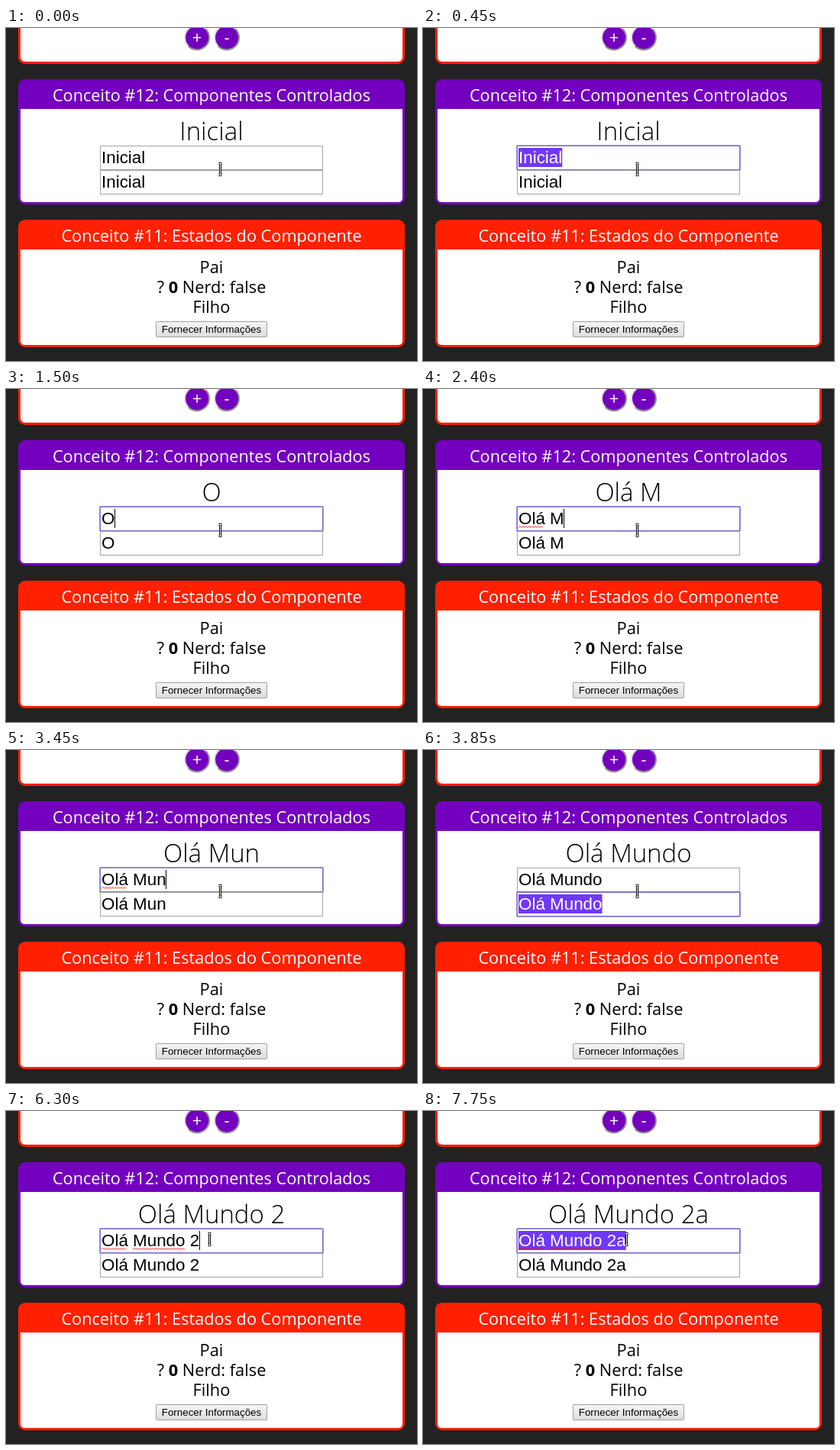
An HTML page that plays this animation: 538x436 px, repeating every 8 s.

```html
<!DOCTYPE html>
<html lang="pt">
<head>
<meta charset="utf-8">
<title>Componentes Controlados</title>
<style>
  html, body { margin: 0; width: 100%; height: 100%; overflow: hidden; background: #222; }
  svg { display: block; width: 538px; height: 436px; }
  text { font-family: "Open Sans", "Noto Sans", sans-serif; font-size: 21.8px; }
  .mid { text-anchor: middle; }
  .head { fill: #fff; font-size: 21.7px; }
  .sign { fill: #fff; font-size: 22px; }
  .title { font-size: 33px; font-weight: 300; }
  .field { font-family: "Liberation Sans", Arial, sans-serif; font-size: 22.4px; }
  .label { font-family: "Liberation Sans", Arial, sans-serif; font-size: 13.33px; }
  .bold { font-weight: 700; }
</style>
</head>
<body>
<svg id="stage" viewBox="0 0 538 436">
  <defs>
    <linearGradient id="face" x1="0" y1="0" x2="0" y2="1">
      <stop offset="0" stop-color="#f6f6f6"/>
      <stop offset="1" stop-color="#dcdcdc"/>
    </linearGradient>
  </defs>
</svg>
<script>
const LOOP = 8000, SHIFT = 38, LEFT = 125;
const PURPLE = '#7300be', RED = '#ff2000';
const stage = document.getElementById('stage');

function add(parent, tag, attrs = {}, content = '') {
  const el = document.createElementNS('http://www.w3.org/2000/svg', tag);
  for (const key in attrs) el.setAttribute(key, attrs[key]);
  if (content) el.textContent = content;
  parent.appendChild(el);
  return el;
}

const set = (el, name, value) => el.setAttribute(name, value);
const show = (el, on) => set(el, 'visibility', on ? 'visible' : 'hidden');
const centred = (parent, y, cls, content) =>
  add(parent, 'text', { x: 269, y, class: 'mid ' + cls }, content);

// Card with a coloured header; returns a function that sets its height
function card(parent, y, color, heading) {
  const outer = add(parent, 'rect', { x: 16, y, width: 506, rx: 9, fill: color });
  const body = add(parent, 'path', { fill: '#fff' });
  centred(parent, y + 29, 'head', heading);
  return h => {
    set(outer, 'height', h);
    set(body, 'd', `M19 ${y + 39}H519V${y + h - 9}q0 6 -6 6H25q-6 0 -6 -6Z`);
  };
}

function roundButton(cx, sign) {
  const cy = 12.5, r = 16, d = r * Math.SQRT1_2;
  const arc = (s, color) => add(stage, 'path', {
    d: `M${cx - s * d} ${cy + s * d}A${r} ${r} 0 0 1 ${cx + s * d} ${cy - s * d}`,
    fill: 'none', stroke: color, 'stroke-width': 2
  });
  add(stage, 'circle', { cx, cy, r, fill: PURPLE });
  arc(1, '#ddd');
  arc(-1, '#8f8f8f');
  add(stage, 'text', { x: cx, y: 20, class: 'mid sign' }, sign);
}

function input(parent, y) {
  add(parent, 'rect', { x: 123.5, y: y + .5, width: 291, height: 31, fill: '#fff', stroke: '#a5a5a5' });
  const ring = add(parent, 'rect', {
    x: 123, y, width: 292, height: 32, rx: 1,
    fill: 'none', stroke: '#6a5ae0', 'stroke-width': 2, 'stroke-opacity': .65
  });
  const mark = add(parent, 'rect', { x: LEFT, y: y + 3, height: 25, fill: '#7138fa' });
  const text = add(parent, 'text', { x: LEFT, y: y + 23, class: 'field' });
  const wave = add(parent, 'path', { fill: 'none', stroke: '#f00', 'stroke-width': .9 });
  const caret = add(parent, 'rect', { y: y + 3, width: 1, height: 25, fill: '#000' });
  return (value, { focus, selected, blink, wrong = [] }) => {
    const end = widthOf(value);
    show(ring, focus);
    show(mark, selected);
    set(mark, 'width', end);
    text.textContent = value;
    set(text, 'fill', selected ? '#fff' : '#000');
    show(caret, focus && !selected && !blink);
    set(caret, 'x', Math.floor(LEFT + end));
    set(wave, 'd', wrong.map(word => squiggle(value, word, y + 26.5)).join(''));
  };
}

const pen = document.createElement('canvas').getContext('2d');
function widthOf(s) {
  pen.font = '22.4px "Liberation Sans", Arial, sans-serif';
  return pen.measureText(s).width;
}

function squiggle(value, word, y) {
  const start = LEFT + widthOf(value.slice(0, value.indexOf(word)));
  const n = Math.floor(widthOf(word) / 4);
  return `M${start} ${y + 1}` + 'l2 -2l2 2'.repeat(n);
}

// Fixed top card
add(stage, 'rect', { x: 16, y: -30, width: 506, height: 77, rx: 9, fill: RED });
add(stage, 'rect', { x: 19, y: -30, width: 500, height: 74, rx: 6, fill: '#fff' });
roundButton(250, '+');
roundButton(289, '-');

const sizeMain = card(stage, 67, PURPLE, 'Conceito #12: Componentes Controlados');
const title = centred(stage, 147, 'title', '');
const fields = add(stage, 'g');
const first = input(fields, 154);
const second = input(fields, 186);

// Cards that move with the height of the one above
const below = add(stage, 'g');
card(below, 251, RED, 'Conceito #11: Estados do Componente')(167);
centred(below, 321, '', 'Pai');
const line = centred(below, 347, '', '? ');
add(line, 'tspan', { class: 'bold' }, '0');
line.append(' Nerd: false');
centred(below, 373, '', 'Filho');
add(below, 'rect', { x: 196.5, y: 384.5, width: 145, height: 20, rx: 1.5, fill: 'url(#face)', stroke: '#a0a0a0' });
centred(below, 399, 'label', 'Fornecer Informações');
card(below, 438, RED, 'Conceito #10: Comunicação Direta')(167);

const beam = add(stage, 'g');
for (const [stroke, width, cap] of [['#000', 3, 'square'], ['#fff', 1, 'butt']])
  add(beam, 'path', {
    d: 'M-2.5 -7.5H1.5M-.5 -7.5V7.5M-2.5 7.5H1.5',
    stroke, 'stroke-width': width, 'stroke-linecap': cap === 'butt' ? cap : 'butt', fill: 'none'
  });
const arrow = add(stage, 'path', {
  d: 'M278.5 182.5V198.5L282 195.2L284.7 201.3L287.5 200L284.8 194.2H289.8Z',
  fill: '#fff', stroke: '#000', 'stroke-width': 1.2, 'stroke-linejoin': 'round'
});

// Each step changes part of the state and keeps the rest
const steps = [
  [0, { value: 'Inicial', focus: 0, selected: false, blink: false, wrong: [] }],
  [50, { focus: 1 }],
  [400, { selected: true }],
  [950, { value: '', selected: false }],
  [1500, { value: 'O' }],
  [1700, { value: 'Ol' }],
  [2000, { value: 'Olá' }],
  [2250, { value: 'Olá ', wrong: ['Olá'] }],
  [2400, { value: 'Olá M' }],
  [2700, { value: 'Olá Mu' }],
  [3100, { value: 'Olá M' }],
  [3300, { value: 'Olá Mu' }],
  [3450, { value: 'Olá Mun' }],
  [3500, { value: 'Olá Mund' }],
  [3600, { value: 'Olá Mundo' }],
  [3850, { focus: 2, selected: true, wrong: [] }],
  [5950, { focus: 1, selected: false }],
  [6250, { value: 'Olá Mundo ', wrong: ['Olá', 'Mundo'] }],
  [6300, { value: 'Olá Mundo 2' }],
  [6900, { blink: true }],
  [7250, { value: 'Olá Mundo 2a', blink: false }],
  [7700, { selected: true }]
];

// Pointer moves in 50 ms hops along a curve
function pointer(t) {
  if (t < 5450) return [281, 185];
  const k = Math.min(1, Math.floor((t - 5450) / 50) / 5);
  return [Math.round(267 + 8 * (1 - k) ** 2), Math.round(185 - 17 * k ** 1.3)];
}

function draw(t) {
  const s = Object.assign({}, ...steps.filter(step => step[0] <= t).map(step => step[1]));
  const empty = s.value === '';
  const move = `translate(0 ${empty ? -SHIFT : 0})`;
  sizeMain(empty ? 164 - SHIFT : 164);
  set(fields, 'transform', move);
  set(below, 'transform', move);
  title.textContent = s.value.trim();
  first(s.value, { ...s, focus: s.focus === 1, selected: s.selected && s.focus === 1 });
  second(s.value, { focus: s.focus === 2, selected: s.selected && s.focus === 2 });
  show(arrow, empty);
  show(beam, !empty);
  set(beam, 'transform', `translate(${pointer(t)})`);
}

function tick() {
  draw(performance.now() % LOOP);
  requestAnimationFrame(tick);
}
tick();
</script>
</body>
</html>
```
